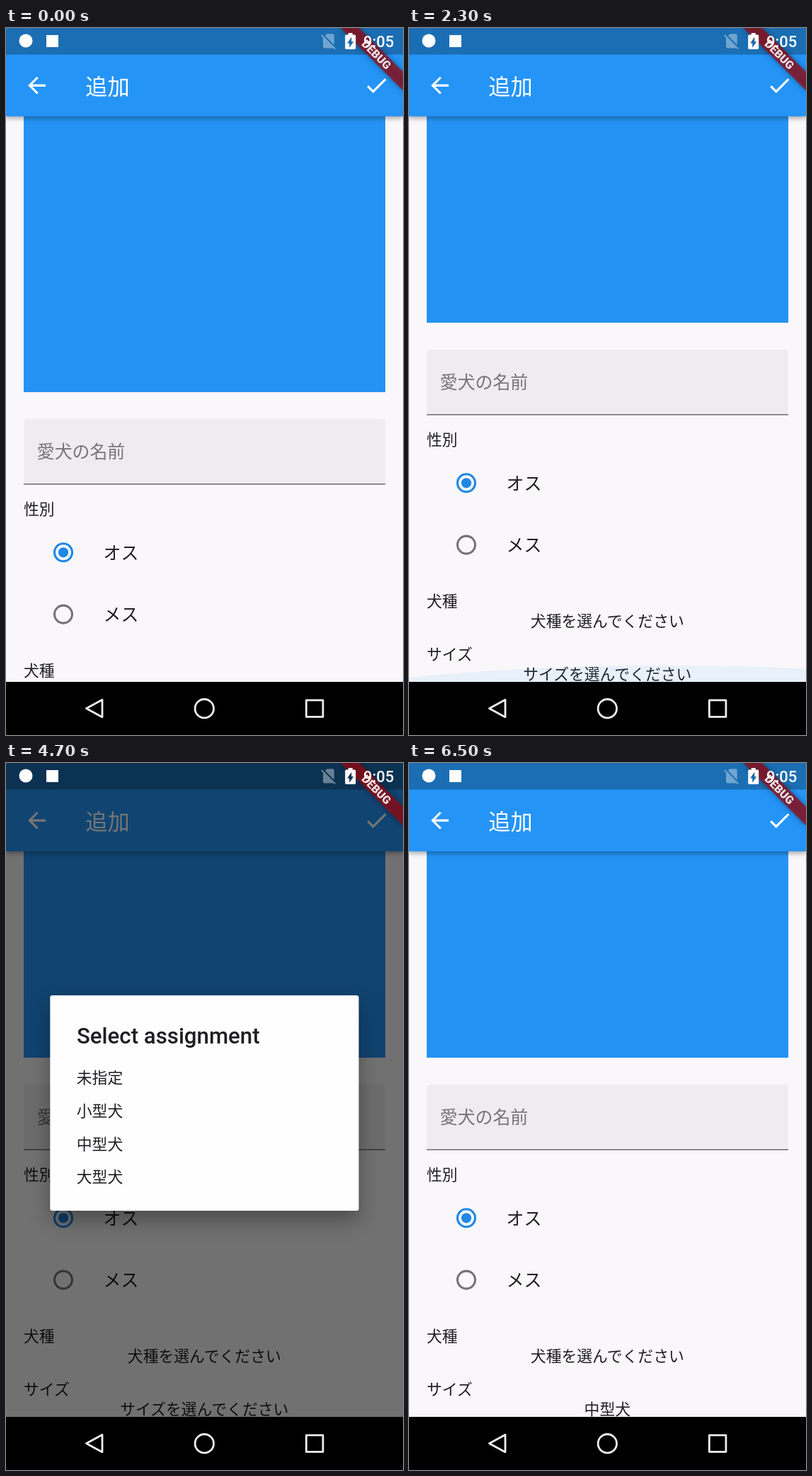
Animation of 561 by 998 pixels, one loop 8 s. Source, as an HTML page:

```html
<!DOCTYPE html>
<html lang="ja">
<head>
<meta charset="utf-8">
<title>追加</title>
<style>
  html, body { margin: 0; width: 100%; height: 100%; overflow: hidden; background: #f9f7fa; }
  svg { display: block; width: 561px; height: 998px; }
  text { font-family: Roboto, "Noto Sans CJK JP", "Noto Sans CJK", sans-serif; fill: #1f1e20; white-space: pre; }
  .body { font-size: 21.8px; }
  .large { font-size: 24.9px; }
  .title { font-size: 31.2px; }
  .bar { filter: drop-shadow(0 3px 3px rgba(0, 0, 0, .32)); }
  .banner { filter: drop-shadow(0 0 4px rgba(0, 0, 0, .5)); }
  .card { filter: drop-shadow(0 14px 14px rgba(0, 0, 0, .32)); }
  .mono { font: 75px "Noto Sans Mono", "DejaVu Sans Mono", monospace; fill: #f00; fill-opacity: .815; }
</style>
</head>
<body>
<svg viewBox="0 0 561 998">
  <defs>
    <clipPath id="view"><rect y="124" width="561" height="799"/></clipPath>
  </defs>
  <rect width="561" height="998" fill="#f9f7fa"/>

  <g clip-path="url(#view)">
    <g id="page">
      <rect x="25" y="20" width="511" height="396" fill="#2493f3"/>
      <path d="M25 546V460q0-6 6-6H530q6 0 6 6V546z" fill="#eeecee"/>
      <rect x="25" y="545" width="511" height="1.6" fill="#777578"/>
      <g fill="none" stroke-width="3.1">
        <circle cx="81" cy="642.3" r="12.5" stroke="#1e88e5"/>
        <circle cx="81" cy="729.6" r="12.5" stroke="#757375"/>
      </g>
      <circle cx="81" cy="642.3" r="7.1" fill="#1e88e5"/>
    </g>
    <path id="glow" fill="#2196f3"/>
  </g>

  <g class="bar">
    <rect width="561" height="124.7" fill="#2494f7"/>
  </g>
  <rect width="561" height="37.5" fill="#1b6eb3"/>
  <g id="bar" fill="#fff">
    <path transform="translate(24.9 62.4) scale(1.558)" d="M20 11H7.83l5.59-5.59L12 4l-8 8 8 8 1.41-1.41L7.83 13H20z"/>
    <path transform="translate(504.8 62.4) scale(1.558)" d="M9 16.17L4.83 12l-1.42 1.41L9 19 21 7l-1.41-1.41z"/>
  </g>

  <rect id="shade" width="561" height="923"/>

  <g id="loading">
    <text class="mono" x="0" y="109">Loading...</text>
    <path d="M0 114.5H449M0 124H449" stroke="#fba050" stroke-width="4" stroke-opacity=".9"/>
  </g>

  <g id="dialog">
    <rect class="card" x="62.3" y="328" width="436.2" height="304" rx="3" fill="#fefdff"/>
    <text class="title" x="100" y="395.5" font-weight="500">Select assignment</text>
  </g>

  <g transform="translate(561 0) rotate(45)">
    <rect class="banner" x="-62.4" y="43.7" width="124.8" height="18.7" fill="#960a14" fill-opacity=".75"/>
    <text y="58.7" font-size="15.9" font-weight="900" text-anchor="middle" style="fill:#fff;fill-opacity:.88">DEBUG</text>
  </g>

  <g fill="#fff">
    <circle cx="28" cy="18" r="9.5"/>
    <rect x="57" y="10" width="17" height="17"/>
    <path fill-opacity=".38" transform="translate(442.4 5) scale(1.12)" d="M18.99 5c0-1.1-.89-2-1.99-2h-7L7.66 5.34 19 16.68zM3.65 3.88L2.38 5.15 5 7.77V19c0 1.1.9 2 2 2h10c.35 0 .67-.1.96-.26l1.88 1.88 1.27-1.27z"/>
    <path transform="translate(468.7 4.8) scale(1.5 1.15)" d="M15.67 4H14V2h-4v2H8.33C7.6 4 7 4.6 7 5.33v15.33C7 21.4 7.6 22 8.33 22h7.33c.74 0 1.34-.6 1.34-1.33V5.33C17 4.6 16.4 4 15.67 4zM11 20v-5.5H9L13 7v5.5h2z"/>
    <text x="505" y="27" font-size="22" font-weight="500" style="fill:#fff">9:05</text>
  </g>

  <rect y="923" width="561" height="75"/>
  <g fill="none" stroke="#eee" stroke-width="2.8" stroke-linejoin="round">
    <path d="M113.5 960.5L136 948.3V972.7z"/>
    <circle cx="280.3" cy="960.7" r="13.2"/>
    <rect x="424.3" y="948.8" width="23.6" height="23.6"/>
  </g>

  <g id="touch">
    <circle r="21" fill="#bcd8fa" fill-opacity=".16"/>
    <circle r="17.3" fill="#fff" fill-opacity=".7" stroke="#a9bfea" stroke-opacity=".6" stroke-width="2"/>
  </g>
</svg>

<script>
const LOOP = 8000, STEP = 100;
const $ = id => document.getElementById(id);

// Adds a line of text whose glyphs are centred on y.
function label(parent, str, x, y, cls = 'body', fill = '', anchor = 'start') {
  const el = document.createElementNS('http://www.w3.org/2000/svg', 'text');
  const size = { body: 21.8, large: 24.9, title: 31.2 }[cls];
  el.setAttribute('class', cls);
  el.setAttribute('x', x);
  el.setAttribute('y', y + size * 0.375);
  el.setAttribute('text-anchor', anchor);
  if (fill) el.style.fill = fill;
  el.textContent = str;
  $(parent).append(el);
  return el;
}

label('bar', '追加', 112.2, 82, 'title', '#fff');
label('page', '愛犬の名前', 43.8, 500, 'large', '#777578');
label('page', '性別', 25, 581);
label('page', 'オス', 137.5, 642.5, 'large');
label('page', 'メス', 137.5, 730, 'large');
label('page', '犬種', 25, 809);
label('page', '犬種を選んでください', 280.3, 837, 'body', '', 'middle');
label('page', 'サイズ', 25, 884);
const size = label('page', '', 280.3, 912, 'body', '', 'middle');
['未指定', '小型犬', '中型犬', '大型犬'].forEach((s, i) => label('dialog', s, 99.8, 444 + i * 46.7));

// Tracks: rows of [time, value], linear in between.
const scroll = [[1400, 98], [1500, 70], [1600, 0]];
const glowSize = [[1600, 0.12], [1700, 0.55], [1800, 0.825], [2000, 0.82]];
const glowAlpha = [[1600, 0.04], [1700, 0.13], [1800, 0.21], [2000, 0.32]];
const shade = [[4500, 0], [4600, 0.34], [4700, 1], [6000, 1], [6100, 0.5], [6200, 0.12], [6300, 0]];
const touches = [
  { x: [[1400, 446], [1800, 462], [2000, 466]],
    y: [[1400, 690], [1500, 645], [1600, 555], [1700, 455], [1800, 378], [1900, 335], [2000, 318]],
    a: [[1300, 0], [1400, 0.8], [1500, 1], [1900, 1], [2000, 0.5], [2100, 0]] },
  { x: [[0, 278]], y: [[0, 918]],
    a: [[4300, 0], [4400, 0.9], [4500, 0.8], [4600, 0.35], [4700, 0]] },
  { x: [[0, 173]], y: [[0, 543]],
    a: [[5700, 0], [5800, 1], [5900, 1], [6000, 0.6], [6100, 0.2], [6200, 0]] }
];

function at(track, t) {
  const i = track.findIndex(row => row[0] > t);
  if (i === 0) return track[0][1];
  if (i < 0) return track[track.length - 1][1];
  const [t0, a] = track[i - 1], [t1, b] = track[i];
  return a + (b - a) * (t - t0) / (t1 - t0);
}

// Overscroll arc: a wide circle squashed towards the bottom edge.
function drawGlow(t) {
  const on = t >= 1600 && t < 2600;
  const left = t > 2000 ? Math.pow(1 - (t - 2000) / 600, 2) : 1;
  const r = 841, k = at(glowSize, t) * left;
  const d = on ? `M${365 - r} ${923 + k * (r - 112.7)}a${r} ${r * k} 0 0 1 ${2 * r} 0z` : '';
  $('glow').setAttribute('d', d);
  $('glow').setAttribute('fill-opacity', at(glowAlpha, t) * left);
}

function draw(t) {
  $('page').setAttribute('transform', `translate(0 ${at(scroll, t)})`);
  drawGlow(t);

  const s = at(shade, t);
  $('shade').setAttribute('fill-opacity', 0.54 * s);
  $('loading').setAttribute('opacity', t >= 4500 && t < 4700 ? s * 1.2 : 0);
  $('dialog').setAttribute('opacity', t >= 4700 ? s : 0);
  size.textContent = t < 6100 ? 'サイズを選んでください' : '中型犬';

  const touch = touches.find(p => at(p.a, t) > 0);
  $('touch').setAttribute('opacity', touch ? at(touch.a, t) : 0);
  if (touch) $('touch').setAttribute('transform', `translate(${at(touch.x, t)} ${at(touch.y, t)})`);
}

const start = performance.now();
function tick() {
  const t = (performance.now() - start) % LOOP;
  draw(Math.floor(t / STEP) * STEP);
  requestAnimationFrame(tick);
}
tick();
</script>
</body>
</html>
```
